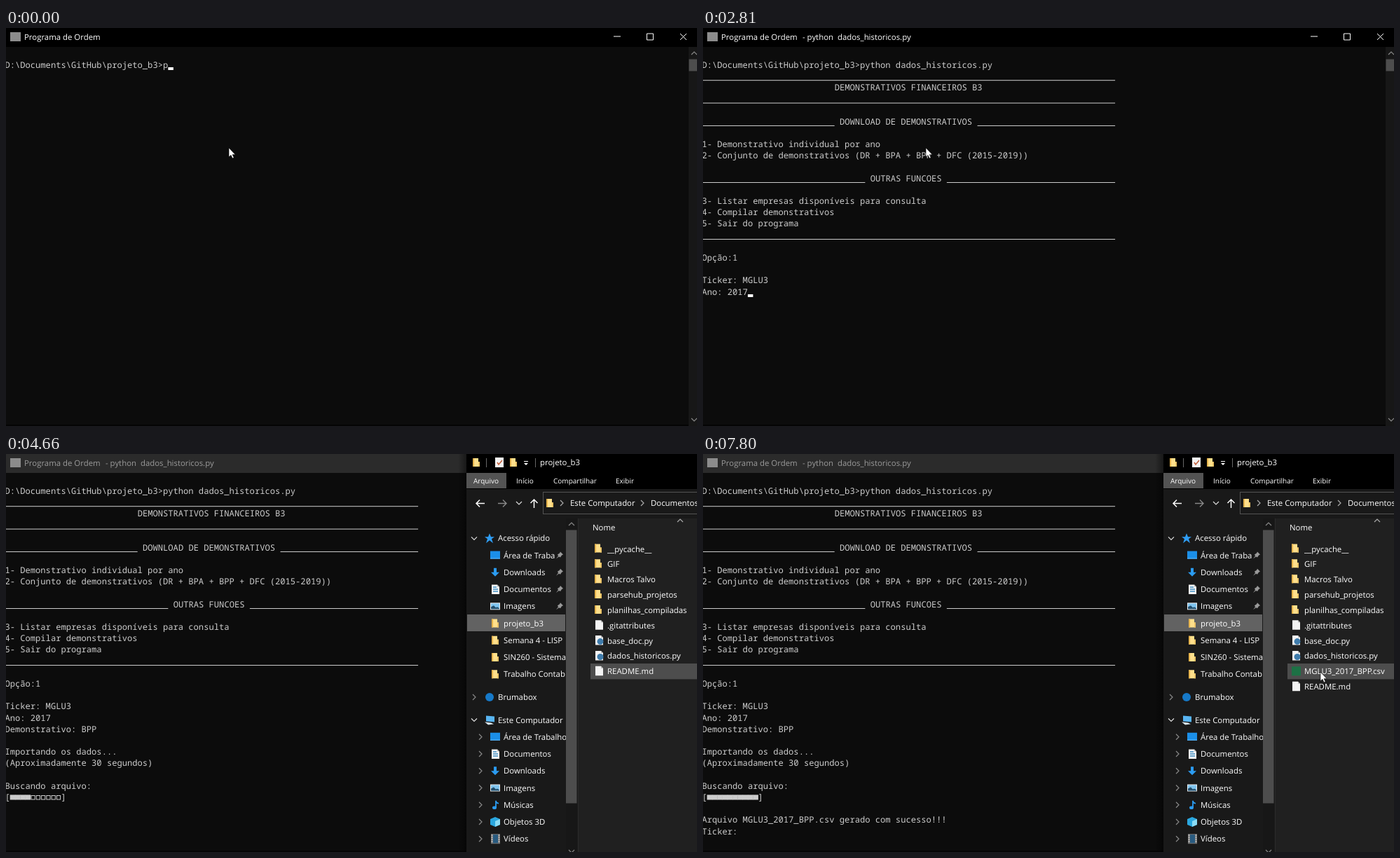
Recreate the animation shown at these times as an HTML page. Size 986x568 px, loop 7890 ms.

```html
<!DOCTYPE html>
<html lang="pt-BR">
<head>
<meta charset="utf-8">
<title>Terminal</title>
<style>
  html, body { margin: 0; width: 986px; height: 568px; overflow: hidden; background: #0c0c0c; }
  svg { display: block; }
  text { white-space: pre; text-rendering: geometricPrecision; }
  .mono { font: 12.13px "Noto Sans Mono", "DejaVu Sans Mono", monospace; fill: #ccc; }
  .ui { font: 11.4px "Open Sans", "Noto Sans", sans-serif; fill: #fff; }
  .tab { font-size: 10px; }
</style>
</head>
<body>
<svg id="stage" width="986" height="568" viewBox="0 0 986 568"></svg>
<script>
const LOOP = 7890, CHAR = 7.28, LEFT = -1.6;
const baseline = row => 56.6 + 16.2 * row;
const column = n => LEFT + CHAR * n;

// Markup helpers
const rect = (x, y, w, h, fill, extra = '') =>
  `<rect x="${x}" y="${y}" width="${w}" height="${h}" fill="${fill}" ${extra}/>`;
const line = (d, color = '#fff', width = 1) =>
  `<path d="${d}" fill="none" stroke="${color}" stroke-width="${width}"/>`;
const shape = (d, fill) => `<path d="${d}" fill="${fill}"/>`;
const at = (x, y, body) => `<g transform="translate(${x} ${y})">${body}</g>`;
const label = (x, y, text, extra = '') => `<text class="ui" x="${x}" y="${y + 4}" ${extra}>${text}</text>`;
const mono = (row, col, text) =>
  `<text class="mono" x="${column(col)}" y="${baseline(row)}">${text}</text>`;
const clipped = (width, body) => `<svg width="${width}" height="568">${body}</svg>`;
const chevron = {
  down: (x, y, color = '#ddd') => line(`M${x - 4} ${y - 2}l4 4l4 -4`, color, 1.2),
  up: (x, y, color = '#888') => line(`M${x - 4} ${y + 2}l4 -4l4 4`, color, 1.2),
  right: (x, y, color = '#888') => line(`M${x - 2} ${y - 4}l4 4l-4 4`, color, 1.2)
};

// Icons, centred on 0,0
const page = shape('M-5 -6.5H3L6 -3.5V7H-5Z', '#f4f4f4') + shape('M3 -6.5V-3.5H6Z', '#b5b5b5');
const icons = {
  folder: shape('M-5 -6H3V-1H5V6H-5Z', '#ffdf8b') + shape('M-5 -6H-3V6H-5Z', '#e5b34c') + shape('M3 -1H5V6H3Z', '#edc366'),
  page,
  script: page + '<circle cx="2" cy="2" r="4.5" fill="#3f7cac"/>',
  sheet: rect(-6, -6, 13, 13, '#1d7145'),
  star: shape('M0 -7L2 -2H7L3 1L5 7L0 3L-5 7L-3 1L-7 -2H-2Z', '#2f9df4'),
  desktop: rect(-7, -6, 14, 11, '#1b8fe8') + rect(-7, 4, 14, 1, '#62bcff'),
  down: shape('M-2 -6H2V0H6L0 6L-6 0H-2Z', '#2b9bf0'),
  document: page + line('M-3 -3H2M-3 0H4M-3 3H4', '#3f8ec4', 1.4),
  picture: rect(-7, -5, 14, 10, '#eee') + rect(-6, -4, 12, 8, '#7fc4ef') + shape('M-6 4V1L-2 -1L1 2L3 1L6 3V4Z', '#24506e'),
  cloud: '<circle r="6" fill="#1679c8"/>',
  computer: shape('M-5 -6L7 -5V3L-5 2Z', '#58b5f2') + shape('M-7 3L2 4L6 6L-2 7Z', '#d8e4ec'),
  music: line('M1 4V-6Q1 -3 5 -2', '#2b9bf0', 1.8) + '<ellipse cx="-1" cy="4" rx="3" ry="2.3" fill="#2b9bf0"/>',
  cube: shape('M0 -7L7 -4V4L0 7L-7 4V-4Z', '#2aa7df') + shape('M0 -1L7 -4V4L0 7Z', '#8bdcf5'),
  film: rect(-6, -7, 13, 14, '#777') + rect(-3, -6, 7, 12, '#295b80')
    + '<path d="M-4.5 -6V6M5.5 -6V6" stroke="#ddd" stroke-width="1.5" stroke-dasharray="1.5"/>'
};
const icon = (name, x, y) => at(x, y, icons[name]);
const pin = (x, y) => at(x, y, shape('M1 -5L5 -1L3 0L1 3L-1 2L-5 5L-2 1L-3 -1L0 -3Z', '#999'));

function terminal() {
  return rect(0, 0, 986, 568, '#0c0c0c')
    + rect(0, 0, 986, 27, '#000', 'id="bar"')
    + rect(6, 6, 15, 13, '#8c8c8c')
    + `<g id="caption">${label(26, 13, 'Programa de Ordem')}
       <g id="running">${label(142, 13, '- python  dados_historicos.py')}</g></g>`
    + line('M867 12h10M914.5 8h9v9h-9zM962 8l9 9M971 8l-9 9')
    + rect(974, 27, 12, 541, '#171717') + rect(974.5, 44.5, 11.5, 17, '#4d4d4d')
    + chevron.up(982, 36) + chevron.down(982, 559, '#888')
    + rect(0, 566, 974, 2, '#050505');
}

function menu() {
  const rules = [[1, 0, 81], [3, 0, 81], [5, 0, 26], [5, 54, 81], [10, 0, 32], [10, 48, 81], [15, 0, 81]];
  return rules.map(([row, from, to]) =>
      rect(column(from), baseline(row) + 1.4, CHAR * (to - from), 1, '#ccc')).join('')
    + mono(2, 26, 'DEMONSTRATIVOS FINANCEIROS B3')
    + mono(5, 27, 'DOWNLOAD DE DEMONSTRATIVOS')
    + mono(7, 0, '1- Demonstrativo individual por ano')
    + mono(8, 0, '2- Conjunto de demonstrativos (DR + BPA + BPP + DFC (2015-2019))')
    + mono(10, 33, 'OUTRAS FUNCOES')
    + mono(12, 0, '3- Listar empresas disponíveis para consulta')
    + mono(13, 0, '4- Compilar demonstrativos')
    + mono(14, 0, '5- Sair do programa');
}

function tree() {
  const row = 24.25;
  const quick = [['desktop', 'Área de Trabalho'], ['down', 'Downloads'], ['document', 'Documentos'], ['picture', 'Imagens'],
    ['folder', 'projeto_b3'], ['folder', 'Semana 4 - LISP'], ['folder', 'SIN260 - Sistemas'], ['folder', 'Trabalho Contabilidade']];
  const places = [['desktop', 'Área de Trabalho'], ['document', 'Documentos'], ['down', 'Downloads'], ['picture', 'Imagens'],
    ['music', 'Músicas'], ['cube', 'Objetos 3D'], ['film', 'Vídeos']];
  const root = (name, text, y, arrow) => chevron[arrow](668, y) + icon(name, 690, y) + label(702, y, text);
  return rect(658, 229, 140, 24, '#626262')
    + root('star', 'Acesso rápido', 120.3, 'down')
    + quick.map(([name, text], i) => {
        const y = 120.3 + row * (i + 1), pinned = i < 4;
        return icon(name, 698, y) + clipped(pinned ? 784 : 799, label(710, y, text)) + (pinned ? pin(790, y) : '');
      }).join('')
    + root('cloud', 'Brumabox', 347, 'right')
    + root('computer', 'Este Computador', 379.5, 'down')
    + places.map(([name, text], i) => {
        const y = 379.5 + row * (i + 1);
        return chevron.right(677, y) + icon(name, 698, y) + label(710, y, text);
      }).join('');
}

function files() {
  const names = ['__pycache__', 'GIF', 'Macros Talvo', 'parsehub_projetos', 'planilhas_compiladas',
    '.gitattributes', 'base_doc.py', 'dados_historicos.py'];
  const kind = i => i < 5 ? 'folder' : i === 5 ? 'page' : 'script';
  const entry = (name, text, y) => icon(name, name === 'folder' ? 845 : 846, y - 1) + label(858, y, text);
  return rect(834, 299, 152, 22.4, '#4d4d4d', 'id="hover"')
    + names.map((text, i) => entry(kind(i), text, 135.5 + 21.85 * i)).join('')
    + `<g id="result">${entry('sheet', 'MGLU3_2017_BPP.csv', 310.3)}</g>`
    + `<g id="readme">${entry('page', 'README.md', 310.3)}</g>`;
}

function explorer() {
  return rect(645, 0, 12, 568, 'url(#shade)')
    + rect(657, 0, 329, 568, '#191919') + rect(657, 0, 329, 50, '#000')
    + icon('folder', 671, 12) + icon('folder', 724, 12)
    + line('M685.5 6v13M755.5 6v13', '#666')
    + at(704, 12, rect(-6, -7, 12, 14, '#f4f4f4') + line('M-3 0l2 3l5 -6', '#c4603c', 1.6))
    + line('M739 10.5h6') + shape('M739 13h6l-3 3z', '#fff')
    + label(762, 12, 'projeto_b3')
    + rect(657, 27, 57, 22, '#535353')
    + [[667, 'Arquivo'], [728, 'Início'], [781, 'Compartilhar'], [870, 'Exibir']]
        .map(([x, text]) => `<text class="ui tab" x="${x}" y="42">${text}</text>`).join('')
    + line('M683 70.5h-12m5 -5l-5 5l5 5', '#fff', 1.5)
    + line('M702 70.5h12m-5 -5l5 5l-5 5', '#888', 1.4)
    + chevron.down(732, 70) + line('M753.5 77v-12m-5 5l5 -5l5 5', '#fff', 1.5)
    + rect(766.5, 54.5, 230, 31, '#191919', 'stroke="#535353"')
    + icon('folder', 776, 70) + chevron.right(793, 70, '#aaa') + label(805, 70, 'Este Computador')
    + chevron.right(908, 70, '#aaa') + label(920, 70, 'Documentos')
    + clipped(799, tree())
    + rect(799, 92, 16, 476, '#171717') + rect(799, 108.5, 15.5, 390, '#4d4d4d')
    + chevron.up(807, 100) + chevron.down(807, 567, '#888')
    + rect(817, 92, 169, 476, '#202020') + rect(816, 92, 1, 476, '#2b2b2b')
    + chevron.up(962, 95, '#aaa') + label(837, 105, 'Nome')
    + files();
}

const stage = document.getElementById('stage');
stage.innerHTML = `<defs><linearGradient id="shade"><stop offset="0" stop-opacity="0"/><stop offset="1" stop-opacity=".45"/></linearGradient></defs>`
  + terminal()
  + `<g id="menu">${menu()}</g>`
  + Array.from({ length: 31 }, (_, row) => mono(row, 0, '')).join('').replaceAll('<text', '<text data-row=""')
  + `<g id="progress">${mono(27, 0, '[')}${mono(27, 11, ']')}`
  + Array.from({ length: 10 }, () => '<rect data-cell="" stroke="#ccc"/>').join('') + '</g>'
  + rect(0, 0, 7.5, 4, '#fff', 'id="caret"')
  + `<g id="explorer">${explorer()}</g>`
  + `<path id="mouse" d="M0 0V13L3 10.4L5.1 15L7.2 14L5.2 9.7H9.2Z" fill="#fff" stroke="#000" stroke-width=".6"/>`;

const el = id => document.getElementById(id);
const rows = stage.querySelectorAll('[data-row]');
const cells = stage.querySelectorAll('[data-cell]');
const show = (id, on) => el(id).setAttribute('visibility', on ? 'visible' : 'hidden');

// Each event sets a terminal row: [time, row, text]
const typing = (start, step, row, prefix, states) =>
  states.map((text, i) => [start + step * i, row, prefix + text]);
const events = [
  ...typing(0, 145, 0, 'D:\\Documents\\GitHub\\projeto_b3>',
    ['p', 'py', 'pyt', 'pyth', 'python', 'python ', 'python d', 'python dados_historicos.py']),
  [1130, 1, ''],
  [1300, 17, 'Opção:'], [1430, 17, 'Opção:1'],
  ...typing(1560, 120, 19, 'Ticker: ', ['', 'M']),
  ...typing(1770, 160, 19, 'Ticker: ', ['MG', 'MGLU', 'MGLU3']),
  ...typing(2250, 170, 20, 'Ano: ', ['', '2']),
  ...typing(2546, 126, 20, 'Ano: ', ['20', '201', '2017']),
  ...typing(2924, 126, 21, 'Demonstrativo: ', ['', 'B', 'BP', 'BPP']),
  [3430, 22, ''],
  [3580, 23, 'Importando os dados...'], [3580, 24, '(Aproximadamente 30 segundos)'],
  [3730, 26, 'Buscando arquivo:'],
  [6670, 29, 'Arquivo MGLU3_2017_BPP.csv gerado com sucesso!!!'], [6670, 30, 'Ticker:']
];
const blockTimes = [3810, 4130, 4440, 4660, 4890, 5130, 5360, 5670, 5990, 6280];

function drawConsole(t) {
  const texts = Array(31).fill('');
  let last = events[0];
  for (const event of events) {
    if (event[0] > t) break;
    texts[event[1]] = event[2];
    last = event;
  }
  rows.forEach((node, i) => { if (node.textContent !== texts[i]) node.textContent = texts[i]; });
  el('caret').setAttribute('x', column(last[2].length));
  el('caret').setAttribute('y', Math.round(baseline(last[1]) - 1));
  show('caret', t < 3580);
  show('menu', t >= 1300);
  show('running', t >= 1130);
  show('progress', t >= 3810);
}

function drawProgress(t) {
  cells.forEach((cell, i) => {
    const full = t >= blockTimes[i], inset = full ? 0 : 1.2;
    const box = { x: column(i + 1) + inset, y: full ? 486.4 : 487.5, width: full ? 7.7 : 5.2, height: full ? 7.1 : 5.5,
      fill: full ? '#ccc' : 'none', 'stroke-width': full ? 0 : 1 };
    for (const key in box) cell.setAttribute(key, box[key]);
  });
}

function drawMouse(t) {
  const pointing = t >= 7120;
  const p = Math.min(1, Math.floor(Math.max(0, t - 7120) / 75) / 9);
  const ease = p * p * (3 - 2 * p);
  const [x, y] = pointing ? [940 - 59 * ease, 311] : [318, 171];
  el('mouse').setAttribute('transform', `translate(${x} ${y})`);
  show('mouse', t < 3580 || pointing);
}

function draw(t) {
  const open = t >= 3810, saved = t >= 6970;
  drawConsole(t);
  drawProgress(t);
  drawMouse(t);
  el('bar').setAttribute('fill', open ? '#2b2b2b' : '#000');
  el('caption').setAttribute('opacity', open ? 0.52 : 1);
  el('explorer').style.display = open ? '' : 'none';
  show('hover', open && (t >= 4560 && t < 6350 || t >= 7045));
  show('result', open && saved);
  el('readme').setAttribute('transform', `translate(0 ${saved ? 21.85 : 0})`);
}

const origin = performance.now();
function tick() {
  draw((performance.now() - origin) % LOOP);
  requestAnimationFrame(tick);
}
tick();
</script>
</body>
</html>
```
